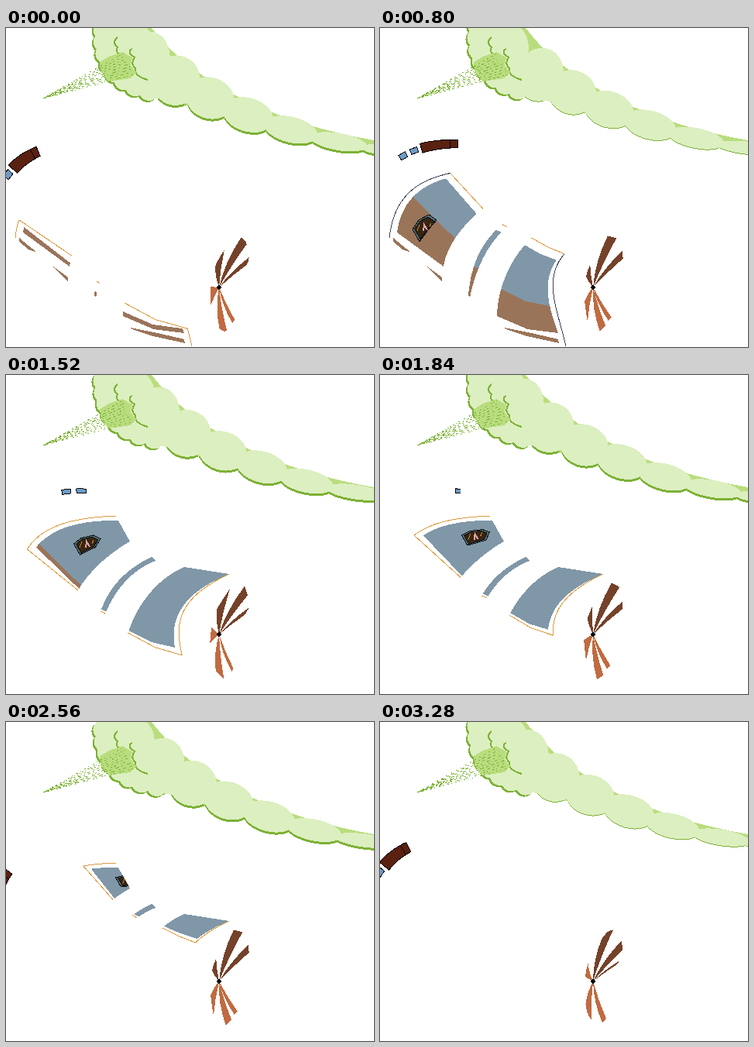
An HTML page that plays this animation: 475 by 412 pixels, repeating every 3.36 s.

```html
<!DOCTYPE html>
<html lang="en">
<head>
<meta charset="utf-8">
<title>Rolling panels</title>
<style>
html, body { margin: 0; width: 100%; height: 100%; overflow: hidden; background: #fff; }
svg { display: block; width: 475px; height: 412px; }
</style>
</head>
<body>
<svg id="stage" viewBox="0 0 475 412" shape-rendering="crispEdges" fill="none">
  <defs>
    <clipPath id="cabinClip"><path id="cabinEdge"/></clipPath>
    <clipPath id="railClip"><rect width="104" height="412"/></clipPath>
  </defs>
  <g id="cloud"></g>
  <g id="panels"></g>
  <g id="porthole" clip-path="url(#cabinClip)"></g>
  <g id="rail" clip-path="url(#railClip)" stroke="#080808"></g>
  <g id="propeller"></g>
</svg>
<script>
const LOOP = 3360, STEP = 80, CYCLE = 6;
const $ = id => document.getElementById(id);
const points = s => s.split(' ').map(pair => pair.split(',').map(Number));
const clamp = (v, lo, hi) => Math.max(lo, Math.min(hi, v));
const lerp = (a, b, k) => a + (b - a) * k;
const mix = (p, q, k) => [lerp(p[0], q[0], k), lerp(p[1], q[1], k)];
const range = (n, f) => Array.from({ length: n }, (_, i) => f(i));
const line = ps => 'M' + ps.map(p => p.map(v => v.toFixed(1)).join(' ')).join('L');
const path = (d, fill, stroke = 'none', width = 1) =>
  `<path d="${d}" fill="${fill}" stroke="${stroke}" stroke-width="${width}"/>`;

// Bezier curve of any degree from "x,y x,y ..."; returns k => point
function curve(text) {
  const control = points(text);
  return k => {
    let ps = control;
    while (ps.length > 1) ps = ps.slice(1).map((p, i) => mix(ps[i], p, k));
    return ps[0];
  };
}
const arc = (c, from, to) => range(21, i => c(lerp(from, to, i / 20)));

function normal(c, k) {
  const a = c(k - .01), b = c(k + .01), d = Math.hypot(b[0] - a[0], b[1] - a[1]);
  return [(a[1] - b[1]) / d, (b[0] - a[0]) / d];
}

// Panels: a sheet rolls upwards behind fixed openings
const strips = [
  { left: curve('22,264 30,205 80,187 145,188'), right: curve('82,308 88,270 125,235 160,215'),
    outer: curve('12,271 20,200 70,185 142,182'), side: 'left', blue: .33 },
  { left: curve('114,346 118,290 145,255 188,235'), right: curve('116,348 127,295 152,256 193,240'), blue: .25 },
  { left: curve('151,372 152,325 180,270 230,248'), right: curve('230,394 213,346 196,295 288,257'),
    outer: curve('240,411 225,345 195,301 288,257'), side: 'right', blue: .24, sag: 6 }
];
const slivers = ['17,271 40,290 29,286 17,276', '57,305 80,322 80,327',
  '161,387 200,395 230,402 231,407 190,398 162,389'].map(points);

function across(s, k, a = s.left, b = s.right) {
  const p = a(k), q = b(k), m = mix(p, q, .5);
  return [p, [m[0], m[1] + (s.sag || 0) * (1 - k)], q];
}
const band = (s, from, to) => line([...arc(s.left, from, to), ...across(s, to),
  ...arc(s.right, to, from), ...across(s, from).reverse()]) + 'Z';

function drawPanels(t) {
  const s = t / 800, lead = Math.min(1, .04 + .336 * s + .284 * s * s), trail = Math.max(0, (t - 940) / 2000);
  if (trail >= 1) return '';
  const orange = '#dc9a3f', navy = '#3c4258', top = Math.min(1, lead + .08), bottom = Math.max(0, trail - .02);
  let out = '';
  for (const s of strips) {
    const blue = Math.max(trail, s.blue);
    const rim = k => line(across(s, k, s.side === 'left' ? s.outer : s.left, s.side === 'right' ? s.outer : s.right));
    out += path(band(s, trail, lead), '#9a7459');
    if (lead > blue) out += path(band(s, blue, lead), '#8097a8');
    if (s.outer) out += path(line(arc(s.outer, bottom, top)), 'none', t > 160 && t < 1120 ? navy : orange);
    if (lead < 1) out += path(rim(top), 'none', orange);
    if (trail > 0) out += path(rim(bottom), 'none', orange);
  }
  if (trail < .05) out += slivers.map(p => path(line(p) + 'Z', '#9a7459')).join('');
  return out;
}

const portPath = curve('57,258 107.5,207 144,204');
const portTilted = points('-15,2 -7,-10 6,-17 16,-10 5,3 -6,18');
const portFlat = points('-18,-4 -7,-7 11,-7 20,-5 18,4 -11,8');

function drawPorthole(t) {
  const k = (t - 800) / 1440;
  if (k < -.25 || k > 1.3) return '';
  const [x, y] = portPath(k), turn = clamp(k, 0, 1);
  const frame = size => line(portTilted.map((p, i) => mix(p, portFlat[i], turn).map((v, n) => (n ? y : x) + v * size))) + 'Z';
  return path(frame(1), '#52717b', '#101010') + path(frame(.82), '#382511', '#101010')
    + path(`M${x - 9} ${y + 4}l3 -8M${x + 7} ${y - 1}l2 -5`, 'none', '#b78a3b')
    + path(`M${x - 1} ${y + 4}l1 -8l4 7`, 'none', '#dba3a5', 2);
}

// Rail: a bar and two tiles travel along one arc and cross the loop seam
const railPath = curve('-20,235 0,172 40,146 112,150');

function ribbon(from, to, thick, fill) {
  const edge = side => range(9, i => {
    const k = lerp(from, to, i / 8), n = normal(railPath, k), p = railPath(k), w = side * lerp(thick, thick * .5, clamp(k, 0, 1));
    return [p[0] + n[0] * w, p[1] + n[1] * w];
  });
  return path(line([...edge(1), ...edge(-1).reverse()]) + 'Z', fill, '#080808');
}
function drawRail(t) {
  return [t, t - LOOP].map(time => {
    const k = .29 + .00042 * time;
    if (k < -.05 || k > 1.2) return '';
    return ribbon(k + .06, k + .32, 9.5, '#5a2010') + ribbon(k + .27, k + .32, 9.5, '#5a2010')
      + [0, .1].map(lag => ribbon(k - lag - .03, k - lag + .03, 5, '#6f9ac6')).join('');
  }).join('');
}

// Propeller: tips follow this rim, one point per half cycle
const rim = points('299,374 293,379 291,385 281,394 267,378 263,344 266,319 273,300 295,267 309,273 313,289 314,301 306,313');
function rimAt(q) {
  const v = clamp(q / 3 + 2, 0, rim.length - 1.001), i = Math.floor(v);
  return mix(rim[i], rim[i + 1], v - i);
}
function drawPropeller(phase) {
  const hub = [275, 335];
  const bend = (p, amount) => {
    const m = mix(hub, p, .5), size = Math.hypot(p[0] - hub[0], p[1] - hub[1]) / 70;
    return `${m[0] - amount * size} ${m[1]}`;
  };
  let out = '';
  for (let q = phase - CYCLE; q <= 30; q += CYCLE) {
    if (q <= -CYCLE) continue;
    const upper = q > 12, a = rimAt(q - 1.2), b = rimAt(q + 1.2), [l, r] = upper ? [a, b] : [b, a];
    out += path(`M${hub}Q${bend(l, 7)} ${l}Q${rimAt(q)} ${r}Q${bend(r, 2.5)} ${hub}Z`, upper ? '#74422a' : '#c06b41');
  }
  return out + `<circle cx="${hub[0]}" cy="${hub[1]}" r="2.6" fill="#000"/>`;
}

// Cloud: lobes roll along the band between two curves
const ridge = curve('188,0 235,62 330,120 475,145');
const base = curve('185,88 270,112 360,150 475,163');
const shoulder = curve('126,-4 122,40 138,72 190,82');

function drawCloud(phase) {
  const light = '#dcefc0', mid = '#b9dd7e', dark = '#7db136', edge = phase % 3 ? 4 : 2;
  const oval = ([x, y, rx, ry, turn], dx, dy, fill) =>
    `<ellipse rx="${rx}" ry="${ry}" transform="translate(${x + dx} ${y + dy}) rotate(${turn})" fill="${fill}"/>`;
  const lobes = range(8, i => .1 + (i - 1) * .18 + phase * .03).filter(k => k > -.02).map(k => {
    const low = base(k), high = ridge(k), n = normal(base, k), [x, y] = mix(low, high, .46);
    const a = base(k - .09), b = base(k + .09);
    return [x, y, Math.hypot(b[0] - a[0], b[1] - a[1]) * .62,
      Math.hypot(low[0] - high[0], low[1] - high[1]) * .45, Math.atan2(-n[0], n[1]) * 180 / Math.PI];
  });
  const puffs = range(8, i => [...shoulder((i + phase / CYCLE) / 7.6), 13, 13, 0]);
  const all = (fill, dy, px, py) => lobes.map(l => oval(l, -1, dy, fill)).join('')
    + puffs.map(p => oval(p, px, py, fill)).join('');
  const under = arc(base, 1.05, 0).map(([x, y]) => [x, y - 3]);
  let out = all(dark, edge - 1, -2, 2);
  out += path(line([...arc(ridge, 0, 1.05), ...under, [150, 60], [125, 0]]) + 'Z', mid);
  out += path('M122 0H182Q196 16 190 38Q218 42 235 64L238 98L190 90L150 72L124 30Z', light);
  out += all(light, 0, 0, 0);
  out += path('M144 12Q136 18 144 25Q140 34 152 35M163 27Q155 31 166 38Q160 46 167 52Q165 62 183 67', 'none', dark, 2);
  return out + drawSpray(phase, mid, dark);
}

function drawSpray(seed, mid, dark) {
  let r = seed * 97 + 13;
  const rand = (lo, hi) => lo + Math.floor((r = (r * 16807 + 7) % 2147483647) / 2147483647 * (hi - lo + 1));
  const rays = range(9, i => `<path d="${line([[48, 91], mix([151, 33], [165, 60], i / 8)])}" stroke="${dark}"
    stroke-dasharray="${rand(2, 5)} ${rand(2, 5)} ${rand(1, 3)} ${rand(3, 6)}" stroke-dashoffset="${rand(0, 15)}"/>`);
  return path('M121 44L133 37L150 31L163 38L161 48L168 57L160 65L132 69L122 56Z', mid) + rays.join('');
}

$('cabinEdge').setAttribute('d', band(strips[0], 0, 1));

function render(time) {
  const frame = Math.floor(time % LOOP / STEP), t = frame * STEP;
  // The cloud runs slightly faster than the frames; the propeller surges late in the loop
  const roll = Math.floor(frame * 19 / 18) + 2;
  const spin = frame + 3 + clamp(Math.floor((frame - 25) / 2.6), 0, 4);
  $('cloud').innerHTML = drawCloud(roll % CYCLE);
  $('panels').innerHTML = drawPanels(t);
  $('porthole').innerHTML = drawPorthole(t);
  $('rail').innerHTML = drawRail(t);
  $('propeller').innerHTML = drawPropeller(spin % CYCLE);
}

const start = performance.now();
function tick() {
  render(performance.now() - start);
  requestAnimationFrame(tick);
}
tick();
</script>
</body>
</html>
```
